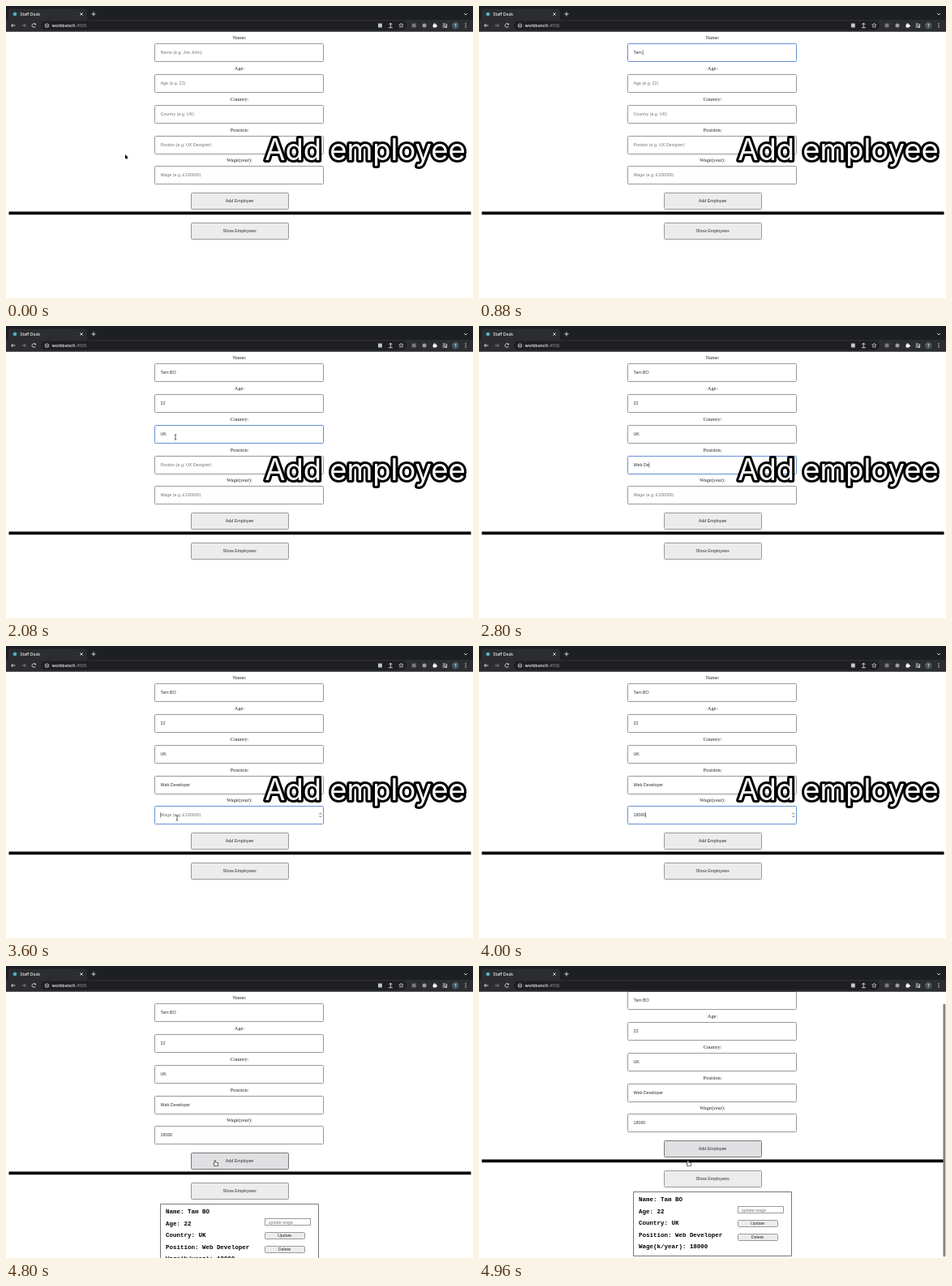
Recreate the animation shown at these times as an HTML page with a canvas. Size 576 px wide and 360 px high, loop 5.04 s.

```html
<!DOCTYPE html>
<html lang="en">
<head>
<meta charset="utf-8">
<title>Staff Desk</title>
<style>
html, body { margin: 0; width: 100%; height: 100%; overflow: hidden; background: #fff; }
canvas { display: block; width: 576px; height: 360px; }
</style>
</head>
<body>
<canvas id="stage" width="576" height="360"></canvas>
<script>
const ctx = document.getElementById('stage').getContext('2d');
const LOOP = 5040, TICK = 80, WAIT = 2 * TICK;
const W = 576, H = 360, MID = W / 2, HEADER = 31.6;
const SANS = '"Liberation Sans", Arial, sans-serif';
const SERIF = '"Liberation Serif", "Times New Roman", serif';
const MONO = '"Liberation Mono", "Courier New", monospace';
const UI = 'Inter, Roboto, sans-serif';
const INK = '#333', EDGE = '#999', BUTTON = '#ececec', LIGHT = '#dfe1e5';
const AT_BUTTON = 4240, PRESS = AT_BUTTON + TICK, ADDED = PRESS + TICK, SCROLL = 4880;

// focus is the time of the click; typing follows after WAIT, one key per TICK
const fields = [
  { name: 'Name', hint: 'Name (e.g. Joe John)', value: 'Tam BO', focus: 480 },
  { name: 'Age', hint: 'Age (e.g. 22)', value: '22', focus: 1200 },
  { name: 'Country', hint: 'Country (e.g. UK)', value: 'UK', focus: 1600 },
  { name: 'Position', hint: 'Postion (e.g. UX Designer)', value: 'Web Developer', focus: 2240 },
  { name: 'Wage', unit: 'year', hint: 'Wage (e.g. £100000)', value: '18000', focus: 3520 }
];
const fieldTop = i => Math.round(46.4 + i * 37.75);

// The pointer visits each field in turn, then the button
const stops = [
  { x: 147, y: 183 },
  ...fields.map((f, i) => ({ x: 207 + i, y: fieldTop(i) + 15, arrive: f.focus, hide: f.focus + WAIT })),
  { x: 259, y: 243, arrive: AT_BUTTON, hide: LOOP }
];

function text(str, x, y, size, font, color, align = 'left', weight = 400) {
  ctx.font = `${weight} ${size}px ${font}`;
  ctx.textAlign = align;
  ctx.fillStyle = color;
  ctx.fillText(str, x, y);
  return ctx.measureText(str).width;
}

function shape(x, y, w, h, r, fill) {
  ctx.beginPath();
  ctx.roundRect(x, y, w, h, r);
  ctx.fillStyle = fill;
  ctx.fill();
}

// A bordered box on whole pixels
function box(x, y, w, h, fill, edge, r = 1) {
  shape(Math.floor(x) + 0.5, Math.floor(y) + 0.5, Math.round(w), Math.round(h), r, fill);
  ctx.strokeStyle = edge;
  ctx.lineWidth = 1;
  ctx.stroke();
}

function disc(x, y, r, fill) {
  shape(x - r, y - r, 2 * r, 2 * r, r, fill);
}

// A line of points placed at x, y and turned by an angle
function line(x, y, angle, points, color, width = 0.9) {
  ctx.save();
  ctx.translate(x, y);
  ctx.rotate(angle);
  ctx.beginPath();
  for (const [px, py] of points) ctx.lineTo(px, py);
  ctx.strokeStyle = color;
  ctx.lineWidth = width;
  ctx.stroke();
  ctx.restore();
}

function dash(x, y, r, angle, color = LIGHT, width = 0.9) {
  line(x, y, angle, [[-r, 0], [r, 0]], color, width);
}

function chevron(x, y, r, angle, color = LIGHT) {
  line(x, y, angle, [[-r, -r], [0, 0], [-r, r]], color);
}

function arrow(x, y, angle, color = LIGHT) {
  dash(x, y, 2.4, angle, color);
  chevron(x + 2.4 * Math.cos(angle), y + 2.4 * Math.sin(angle), 2, angle, color);
}

function cross(x, y, r, angle) {
  dash(x, y, r, angle);
  dash(x, y, r, angle + Math.PI / 2);
}

function drawField(field, i, t) {
  const top = fieldTop(i);
  const blur = fields[i + 1] ? fields[i + 1].focus : PRESS;
  const focused = t >= field.focus && t < blur;
  const keys = Math.floor((t - field.focus - WAIT) / TICK) + 1;
  const count = Math.max(0, Math.min(field.value.length, keys));
  const typed = field.value.slice(0, count);
  const label = field.unit ? `${field.name}(${field.unit}):` : `${field.name}:`;
  text(label, MID, top - 5.4, 6.4, SERIF, '#222', 'center');
  box(183, top, 208, 22, '#fff', focused ? '#6690d4' : EDGE);
  const width = text(typed || field.hint, 190.5, top + 13.2, 5.33, SANS, typed ? INK : '#777');
  if (!focused) return;
  const lastKey = count ? field.focus + WAIT + (count - 1) * TICK : field.focus;
  if ((t - lastKey) % 400 < 200) dash(190.7 + (typed && width), top + 11.4, 3.2, Math.PI / 2, INK, 0.6);
  if (field.unit) {
    chevron(387.7, top + 9, 1.4, -Math.PI / 2, '#555');
    chevron(387.7, top + 14, 1.4, Math.PI / 2, '#555');
  }
}

function drawButton(label, x, y, w, h, fill = BUTTON, edge = EDGE) {
  box(x, y, w, h, fill, edge);
  text(label, x + w / 2, y + h / 2 + 2, 5.33, SANS, INK, 'center');
}

function drawCard() {
  box(190, 293, 195, 79, '#fff', '#777', 0);
  fields.forEach((f, i) => {
    const label = f.unit ? `${f.name}(k/${f.unit})` : f.name;
    text(`${label}: ${f.value}`, 197, 305.3 + i * 14.4, 7.49, MONO, '#000', 'left', 700);
  });
  box(319, 311, 56, 8, '#fff', EDGE, 0);
  text('update wage', 323.5, 317.7, 5.33, SANS, '#777');
  drawButton('Update', 319, 328, 49, 8);
  drawButton('Delete', 319, 345, 49, 8);
}

function drawPage(t, scroll) {
  const pressed = t >= PRESS && t < ADDED;
  const fill = pressed ? '#f4f4f4' : t >= AT_BUTTON ? '#e0e0e3' : BUTTON;
  ctx.save();
  ctx.translate(0, -scroll);
  fields.forEach((field, i) => drawField(field, i, t));
  drawButton('Add Employee', 228, 230, 120, 20, fill, t >= ADDED ? '#777' : EDGE);
  shape(3.5, 253.4, 570, 3.8, 0, '#000');
  drawButton('Show Employees', 228, 267, 120, 20);
  if (t >= ADDED) drawCard();
  ctx.restore();
  if (scroll) shape(572.4, HEADER + scroll, 3, 312, 1.5, '#858585');
}

function drawTabs() {
  shape(0, 0, W, HEADER, 0, '#1e1f22');
  shape(0, 17, W, HEADER - 17, 0, '#2c2d31');
  shape(3, 3.4, 97, 16, 3, '#2c2d31');
  disc(11, 10, 2.3, '#4fb3cf');
  text('Staff Desk', 17.2, 11.9, 5, UI, '#f1f3f4', 'left', 500);
  cross(93, 10, 2.2, Math.PI / 4);
  cross(108, 10, 2.6, 0);
  chevron(567, 11, 2, Math.PI / 2);
}

function drawAddressBar(y) {
  arrow(9, y, Math.PI);
  arrow(22, y, 0, '#85878a');
  ctx.beginPath();
  ctx.arc(34.4, y, 2.3, 0.5, 5.4);
  ctx.strokeStyle = LIGHT;
  ctx.lineWidth = 0.9;
  ctx.stroke();
  disc(36.2, y - 1.6, 0.9, LIGHT);

  shape(43, y - 5.4, 451, 10.8, 5.4, '#1e1f22');
  disc(50.5, y, 2.6, LIGHT);
  disc(50.5, y, 1.9, '#1e1f22');
  dash(50.5, y, 1.2, Math.PI / 2);
  const width = text('workbench', 56.5, y + 1.9, 5.4, UI, '#fff', 'left', 500);
  text(':4100', 56.5 + width, y + 1.9, 5.4, UI, '#9aa0a6');
}

function drawToolbarIcons(y) {
  shape(459, y - 2.4, 4.8, 4.8, 0.5, '#c4c7cb');
  arrow(474.4, y - 0.6, -Math.PI / 2);
  dash(474.4, y + 2.7, 2.4, 0);
  const star = Array.from({ length: 11 }, (_, i) => {
    const a = i * Math.PI / 5, r = i % 2 ? 1.3 : 2.9;
    return [r * Math.cos(a), r * Math.sin(a)];
  });
  line(487.4, y, -Math.PI / 2, star, LIGHT, 0.7);
  shape(500.7, y - 2.4, 4.8, 4.8, 0, '#77797d');
  disc(516, y, 2.5, '#9b9da0');
  shape(526.6, y - 1.6, 4.2, 4.2, 0.5, '#fff');
  disc(528.6, y - 1.8, 1, '#fff');
  disc(531, y + 0.4, 1, '#fff');
  for (const i of [-1, 0, 1]) {
    dash(540.5, y + 2 * i, 1.8, 0);
    disc(567, y + 2.2 * i, 0.7, LIGHT);
  }
  dash(543.6, y, 2, Math.PI / 2);
  disc(542.8, y + 2, 1, LIGHT);
  disc(554.3, y, 4.2, '#455a64');
  text('T', 554.3, y + 1.8, 5, UI, '#fff', 'center');
}

function drawCaption() {
  ctx.save();
  ctx.font = `400 36.4px ${UI}`;
  ctx.textAlign = 'center';
  ctx.lineJoin = 'round';
  ctx.lineWidth = 6;
  ctx.strokeStyle = '#000';
  ctx.strokeText('Add employee', 443, 190.4);
  ctx.fillStyle = '#fff';
  ctx.fillText('Add employee', 443, 190.4);
  ctx.restore();
}

function drawHand() {
  for (const [grow, color] of [[0.6, '#222'], [0, '#fff']]) {
    const part = (x, y, w, h) => shape(x - grow, y - grow, w + 2 * grow, h + 2 * grow, 0.8, color);
    part(-1.7, -2.8, 1, 4);
    part(-1.7, -0.4, 3.8, 3.8);
    part(-2.6, 0.4, 1.2, 1.6);
  }
}

function drawBeam() {
  dash(0, 0, 3, Math.PI / 2, '#222', 0.7);
  for (const end of [-3, 3]) dash(0, end, 1.2, 0, '#222', 0.7);
}

function drawArrowPointer() {
  const head = [[0, 0], [0, 5.2], [3.7, 3.7], [0, 0]];
  line(0, 0, 0, head, '#fff', 1.2);
  line(1.8, 4.6, 1.15, [[-1, 0], [1.2, 0]], '#000', 1);
  ctx.beginPath();
  for (const [x, y] of head) ctx.lineTo(x, y);
  ctx.fillStyle = '#000';
  ctx.fill();
}

function drawPointer(t) {
  const i = stops.findIndex(s => t < s.hide);
  const from = stops[i - 1], to = stops[i];
  const leave = i === 1 ? TICK : to.arrive - WAIT;
  if (i > 1 && t < leave) return;
  const p = Math.max(0, Math.min(1, (t - leave) / (to.arrive - leave)));
  const ease = p * p * (3 - 2 * p);
  const x = from.x + (to.x - from.x) * ease;
  const y = from.y + (to.y - from.y) * ease;
  const overField = x > 183 && fields.some((_, n) => y > fieldTop(n) && y < fieldTop(n) + 22);
  ctx.save();
  ctx.translate(x, y);
  if (t >= AT_BUTTON) drawHand();
  else if (overField) drawBeam();
  else drawArrowPointer();
  ctx.restore();
}

function frame(now) {
  const t = Math.floor((now % LOOP) / TICK) * TICK;
  const scroll = Math.max(0, Math.min(15, Math.round((t - SCROLL + TICK) / TICK * 7.5)));
  shape(0, 0, W, H, 0, '#fff');
  drawPage(t, scroll);
  drawTabs();
  drawAddressBar(24);
  drawToolbarIcons(24);
  if (t < ADDED) drawCaption();
  drawPointer(t);
}

const began = performance.now();
function loop() {
  frame(performance.now() - began);
  requestAnimationFrame(loop);
}
loop();
</script>
</body>
</html>
```
